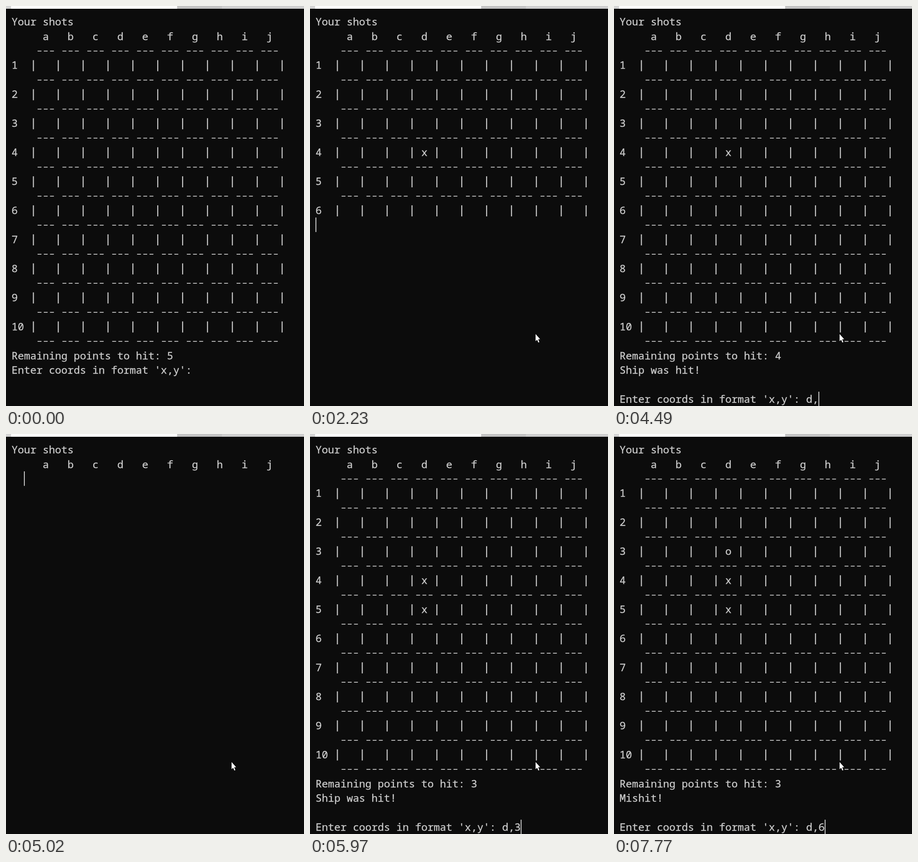
Write an HTML page with a canvas that moves like this. It is 646 px wide and 867 px high and loops after 8000 ms.

```html
<!DOCTYPE html>
<html lang="en">
<head>
<meta charset="utf-8">
<title>Your shots</title>
<style>
  html, body { margin: 0; width: 100%; height: 100%; overflow: hidden; background: #0c0c0c; }
  canvas { display: block; width: 646px; height: 867px; }
</style>
</head>
<body>
<canvas id="stage" width="646" height="867"></canvas>
<script>
const ctx = document.getElementById('stage').getContext('2d');
const LOOP = 8000, LEFT = 12, TOP = 18, CELL = 13.48, LINE = 31.46;
const INK = '#cccccc';
const PROMPT = "Enter coords in format 'x,y': ";

// Each entry changes part of the state from its time on.
// cut: [rows already printed, caret column] while the screen is being redrawn.
const script = [
  [0, { marks: {}, points: 5, message: '', typed: '', caret: false, cut: null }],
  [210, { caret: true }],
  [670, { typed: 'd' }],
  [1130, { caret: false }],
  [1280, { typed: 'd,', caret: true }],
  [1450, { typed: 'd,4' }],
  [1910, { caret: false }],
  [2140, { marks: { 4: 'x' }, points: 4, message: 'Ship was hit!', typed: '', caret: true, cut: [0, 0] }],
  [2230, { cut: [14, 0] }],
  [2320, { cut: null }],
  [2610, { caret: false }],
  [3240, { caret: true }],
  [3390, { typed: 'd' }],
  [3540, { typed: 'd,' }],
  [4020, { caret: false }],
  [4490, { caret: true }],
  [4560, { typed: 'd,5' }],
  [5020, { marks: { 4: 'x', 5: 'x' }, points: 3, typed: '', cut: [2, 2] }],
  [5110, { cut: [14, 0] }],
  [5190, { cut: null }],
  [5570, { typed: 'd' }],
  [5660, { typed: 'd,' }],
  [5970, { typed: 'd,3' }],
  [6350, { marks: { 3: 'o', 4: 'x', 5: 'x' }, message: 'Mishit!', typed: '', cut: [14, 0] }],
  [6430, { cut: null }],
  [6810, { caret: false }],
  [6900, { typed: 'd' }],
  [6980, { caret: true }],
  [7130, { typed: 'd,' }],
  [7600, { caret: false }],
  [7770, { typed: 'd,6', caret: true }]
];

function stateAt(time) {
  const state = {};
  for (const [start, change] of script) if (start <= time) Object.assign(state, change);
  return state;
}

function screenLines({ marks, points, message, typed }) {
  const rule = '    ' + '--- '.repeat(10);
  const lines = ['Your shots', '     ' + [...'abcdefghij'].join('   '), rule];
  for (let n = 1; n <= 10; n++) {
    let row = String(n).padEnd(3);
    for (let col = 0; col < 10; col++) row += `| ${col === 3 && marks[n] || ' '} `;
    lines.push(row + '|', rule);
  }
  lines.push('Remaining points to hit: ' + points);
  if (message) lines.push(message, '');
  lines.push(PROMPT + typed);
  return lines;
}

function rect(color, x, y, w, h) {
  ctx.fillStyle = color;
  ctx.fillRect(x, y, w, h);
}

function drawLine(line, row) {
  const top = TOP + row * LINE;
  const baseline = Math.round(top + 24.1);
  [...line].forEach((char, col) => {
    const x = LEFT + (col + 0.5) * CELL;
    if (char === '-') rect(INK, x - 4.2, top + 15.9, 8.4, 1.7);
    else if (char === '|') rect(INK, x - 0.9, top + 5, 2.2, 24);
    else if (char !== ' ') {
      ctx.fillStyle = INK;
      ctx.fillText(char, x, baseline);
      ctx.strokeText(char, x, baseline);
    }
  });
}

function drawPointer(time) {
  if (time < 70) return;
  const rest = (1 - Math.min(1, (time - 70) / 290)) ** 2;
  ctx.save();
  ctx.translate(489 + 66 * rest, 711 + 139 * rest);
  ctx.beginPath();
  for (const [x, y] of [[0, 0], [0, 15.5], [3.4, 12.4], [6, 18.5], [8.2, 17.6], [5.7, 11.6], [10, 11.2]]) ctx.lineTo(x, y);
  ctx.closePath();
  ctx.lineWidth = 1;
  ctx.strokeStyle = '#000';
  ctx.stroke();
  ctx.fillStyle = '#fff';
  ctx.fill();
  ctx.restore();
}

function draw(time) {
  rect('#0c0c0c', 0, 0, 646, 867);
  rect('#d4d4d4', 0, 0, 11, 6);
  rect('#ffffff', 11, 0, 360, 6);
  rect('#c3c3c3', 371, 0, 97, 6);
  rect('#cecece', 468, 0, 178, 6);

  ctx.font = '22.47px "Noto Sans Mono", "DejaVu Sans Mono", monospace';
  ctx.textAlign = 'center';
  ctx.lineWidth = 0.35;
  ctx.strokeStyle = INK;
  const state = stateAt(time);
  const lines = screenLines(state);
  const [rows, caretCol] = state.cut || [lines.length, lines.at(-1).length];
  lines.slice(0, rows).forEach(drawLine);
  if (state.caret) {
    const caretRow = state.cut ? rows : rows - 1;
    rect('#ffffff', LEFT + caretCol * CELL, TOP + caretRow * LINE, 1.5, LINE);
  }
  drawPointer(time);
}

const begin = performance.now();
function tick() {
  draw((performance.now() - begin) % LOOP);
  requestAnimationFrame(tick);
}
tick();
</script>
</body>
</html>
```
